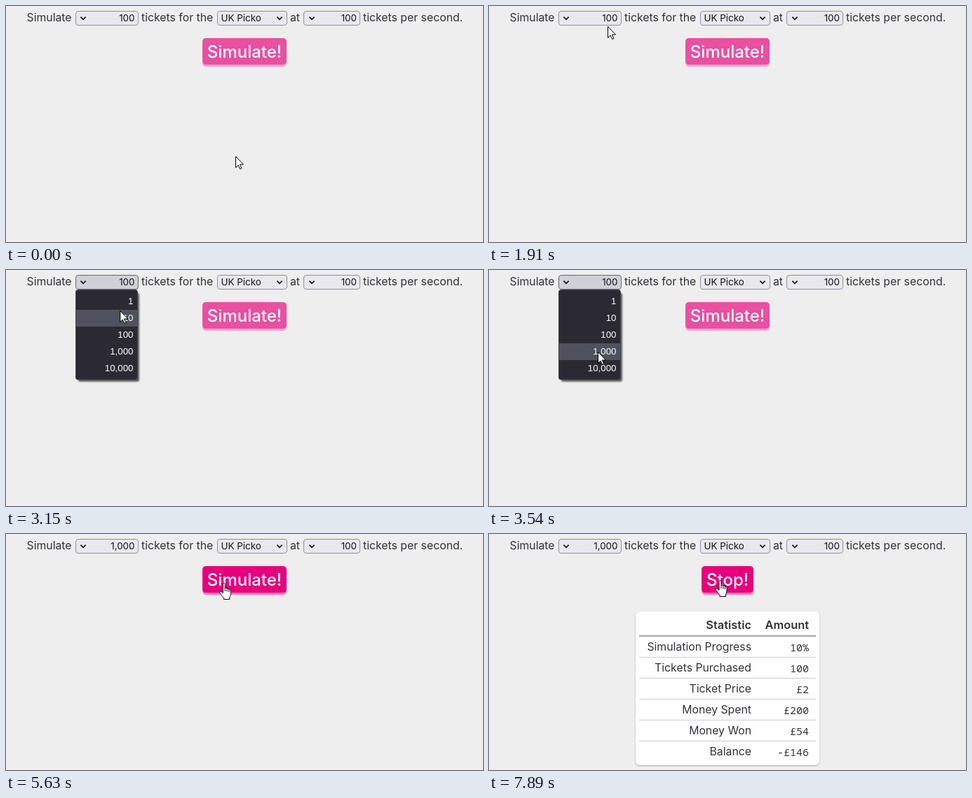
An HTML page for the animation above (8000 ms loop, 680 by 338 pixels).

```html
<!DOCTYPE html>
<html lang="en">
<head>
<meta charset="utf-8">
<title>Lottery simulator</title>
<style>
  html, body { margin: 0; width: 100%; height: 100%; overflow: hidden; background: #eee; }
  svg { display: block; width: 680px; height: 338px; }
  text { font: 15.8px Inter, "Open Sans", sans-serif; fill: #333238; white-space: pre; }
  .end text, text.end { text-anchor: end; }
  .field { fill: #e9e9ed; stroke: #8f8f9d; }
  .chevron { fill: none; stroke: #15141a; stroke-width: 1.7; }
  text.value { font-size: 13.4px; fill: #15141a; }
  .menu text { font: 13.333px "Liberation Sans", Arial, sans-serif; fill: #fbfbfe; }
  text.label { font-size: 24px; font-weight: 500; fill: #fff; text-anchor: middle; }
  .head text { font-size: 16.4px; font-weight: 600; }
  .amounts text { font: 15px "Noto Sans Mono", "DejaVu Sans Mono", monospace; }
  .face { fill: #e850a1; }
  .lip { fill: #f3a3cf; }
  .hot .face, .stop .face { fill: #e6007e; }
  .hot .lip, .stop .lip { fill: #f377b6; }

  /* All state changes share one 8 s clock. */
  .count, .picked, .menu, .first, .bar, .cool, .hot, .press, .stop, .card,
  .zero, .run, .arrow, .hand, .cursor { animation: 8s step-end infinite; }
  .first { animation-name: first; }
  .count { animation-name: count; }
  .picked { animation-name: picked; }
  .menu { animation-name: menu; }
  .bar { animation-name: bar; }
  .cool, .arrow { animation-name: cool; }
  .hand { animation-name: hover; }
  .hot { animation-name: hot; }
  .press { animation-name: press; }
  .stop, .card { animation-name: started; }
  .zero { animation-name: zero; }
  .run { animation-name: run; }
  .cursor { animation-name: move; }

  @keyframes first {
    0%, 100% { fill: #e9e9ed; stroke: #8f8f9d; }
    24.75% { fill: #d0d0d7; stroke: #676774; }
    31.75% { fill: #b1b1b9; stroke: #545460; }
    33.56% { fill: #d0d0d7; stroke: #676774; }
    53.94% { fill: #e9e9ed; stroke: #8f8f9d; }
  }
  @keyframes count { 0% { opacity: 1; } 53.94%, 100% { opacity: 0; } }
  @keyframes picked { 0% { opacity: 0; } 53.94%, 100% { opacity: 1; } }
  @keyframes menu { 0% { opacity: 0; } 32.56% { opacity: 1; } 53.94%, 100% { opacity: 0; } }
  @keyframes bar {
    0% { transform: translateY(48px); }
    36.5% { transform: translateY(0); }
    38.44% { transform: translateY(24px); }
    41.35% { transform: translateY(48px); }
    43.22%, 100% { transform: translateY(72px); }
  }
  @keyframes cool { 0% { opacity: 1; } 67.45%, 100% { opacity: 0; } }
  @keyframes hover { 0% { opacity: 0; } 67.45%, 100% { opacity: 1; } }
  @keyframes hot { 0% { opacity: 0; } 67.45% { opacity: 1; } 86.94%, 100% { opacity: 0; } }
  @keyframes press { 0% { transform: translateY(0); } 84.81% { transform: translateY(2px); } 86.94%, 100% { transform: translateY(0); } }
  @keyframes started { 0% { opacity: 0; } 86.94%, 100% { opacity: 1; } }
  @keyframes zero { 0% { opacity: 1; } 98.56%, 100% { opacity: 0; } }
  @keyframes run { 0% { opacity: 0; } 98.56%, 100% { opacity: 1; } }

  /* The pointer advances in short hops, slower at both ends of each trip. */
  @keyframes move {
    0% { transform: translate(327px, 215px); }
    6.6% { transform: translate(327px, 215px); animation-timing-function: steps(4, start); }
    10.47% { transform: translate(302px, 190px); animation-timing-function: steps(4, start); }
    14.31% { transform: translate(232px, 128px); animation-timing-function: steps(3, start); }
    17.2% { transform: translate(198px, 108px); animation-timing-function: steps(4, start); }
    21% { transform: translate(179px, 58px); animation-timing-function: steps(4, start); }
    24.75% { transform: translate(169px, 29px); animation-timing-function: steps(2, start); }
    27% { transform: translate(166px, 22px); }
    36.5% { transform: translate(166px, 22px); animation-timing-function: steps(4, start); }
    40.375% { transform: translate(161px, 70px); animation-timing-function: steps(5, start); }
    45.125% { transform: translate(155px, 117px); }
    58.75% { transform: translate(155px, 117px); animation-timing-function: steps(6, start); }
    64.375% { transform: translate(206px, 106px); animation-timing-function: steps(5, start); }
    69.5% { transform: translate(301px, 73px); animation-timing-function: steps(3, start); }
    72.3%, 100% { transform: translate(329px, 67px); }
  }
</style>
</head>
<body>
<svg viewBox="0 0 680 338">
  <defs>
    <path id="chev" d="M-3.6 -1.8L0 1.8L3.6 -1.8"/>
    <filter id="soft" x="-10%" y="-10%" width="120%" height="120%"><feGaussianBlur stdDeviation="1.3"/></filter>
  </defs>

  <text x="29.5" y="22">Simulate</text>
  <text x="193" y="22">tickets for the</text>
  <text x="405" y="22">at</text>
  <text x="509" y="22">tickets per second.</text>

  <rect class="field first" x="99.5" y="7.5" width="89" height="20" rx="3.5"/>
  <rect class="field" x="301.5" y="7.5" width="99" height="20" rx="3.5"/>
  <rect class="field" x="424.5" y="7.5" width="80" height="20" rx="3.5"/>
  <g class="chevron">
    <use href="#chev" x="110" y="17.5"/>
    <use href="#chev" x="390" y="17.5"/>
    <use href="#chev" x="436" y="17.5"/>
  </g>
  <text class="value end count" x="183.5" y="22">100</text>
  <text class="value end picked" x="183.5" y="22">1,000</text>
  <text class="value" x="306.5" y="22">UK Picko</text>
  <text class="value end" x="500" y="22">100</text>

  <g class="press">
    <g class="cool">
      <rect class="lip" x="280" y="46" width="120" height="41" rx="5"/>
      <rect class="face" x="280" y="46" width="120" height="38" rx="5"/>
      <text class="label" x="340" y="73.5">Simulate!</text>
    </g>
    <g class="hot">
      <rect class="lip" x="280" y="46" width="120" height="41" rx="5"/>
      <rect class="face" x="280" y="46" width="120" height="38" rx="5"/>
      <text class="label" x="340" y="73.5">Simulate!</text>
    </g>
  </g>
  <g class="stop">
    <rect class="lip" x="303" y="46" width="74" height="41" rx="5"/>
    <rect class="face" x="303" y="46" width="74" height="38" rx="5"/>
    <text class="label" x="340" y="73.5">Stop!</text>
  </g>

  <g class="card end">
    <rect x="209" y="112" width="262" height="220" rx="6" fill="#000" opacity=".3" filter="url(#soft)"/>
    <rect x="209" y="111" width="262" height="220" rx="6" fill="#fff"/>
    <path d="M214 146H466" stroke="#a3a7a7" stroke-width="2"/>
    <path d="M214 176.5H466M214 206.5H466M214 236.5H466M214 266.5H466M214 296.5H466" stroke="#ccc"/>
    <g class="head">
      <text x="374" y="136">Statistic</text>
      <text x="456" y="136">Amount</text>
    </g>
    <text x="374" y="167">Simulation Progress</text>
    <text x="374" y="197">Tickets Purchased</text>
    <text x="374" y="227">Ticket Price</text>
    <text x="374" y="257">Money Spent</text>
    <text x="374" y="287">Money Won</text>
    <text x="374" y="317">Balance</text>
    <g class="amounts">
      <text x="456" y="228">£2</text>
      <g class="zero">
        <text x="456" y="168">0%</text>
        <text x="456" y="198">0</text>
        <text x="456" y="258">£0</text>
        <text x="456" y="288">£0</text>
        <text x="456" y="318">£0</text>
      </g>
      <g class="run">
        <text x="456" y="168">10%</text>
        <text x="456" y="198">100</text>
        <text x="456" y="258">£200</text>
        <text x="456" y="288">£54</text>
        <text x="456" y="318">-£146</text>
      </g>
    </g>
  </g>

  <g class="menu end">
    <rect x="103" y="33" width="87" height="127" rx="3" fill="#000" opacity=".6" filter="url(#soft)"/>
    <rect x="99.5" y="28.5" width="88" height="128.5" rx="3" fill="#2b2a33" stroke="#45444f"/>
    <rect class="bar" x="100" y="33" width="87" height="24" fill="#52525e"/>
    <text x="181.5" y="49">1</text>
    <text x="181.5" y="73">10</text>
    <text x="181.5" y="97">100</text>
    <text x="181.5" y="121">1,000</text>
    <text x="181.5" y="145">10,000</text>
  </g>

  <g class="cursor" fill="#fff" stroke="#000" stroke-linejoin="round">
    <path class="arrow" d="M.5 .5V16.5L4.1 13L6.7 18.5L8.9 17.5L6.4 12H11.5Z"/>
    <g class="hand">
      <g transform="translate(-6.5 -1)">
        <path d="M5.5 14.5V2.2Q5.5 .5 7 .5T8.5 2.2V8Q8.8 6.8 10 7T11.3 8.5Q11.6 7.6 12.6 7.9T13.9 9.5Q14.3 8.8 15.2 9.2T16.5 11V16Q16.5 18.5 15 20.5V23.5H6.5V21.5Q4 19 1 14.5Q-.2 12.6 1.2 12T4 13.2Z"/>
        <path d="M8.5 8V12M11.3 8.5V12.5M13.9 9.5V13" fill="none"/>
      </g>
    </g>
  </g>
</svg>
</body>
</html>
```
